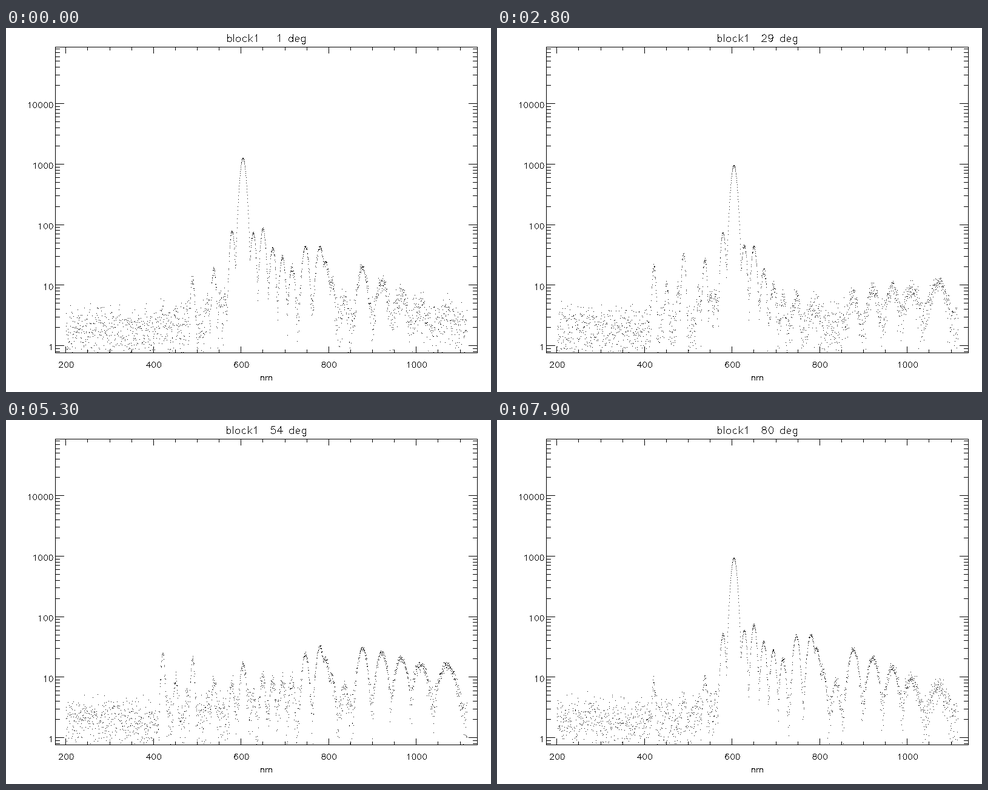
Recreate the animation shown at these times as a matplotlib script. Size 800 by 600 pixels, loop 8000 ms.

```python
import numpy as np
import matplotlib.pyplot as plt
from matplotlib.animation import FuncAnimation

W, H, DPI = 800, 600, 100
FRAMES, STEP = 80, 100
LEFT, RIGHT, TOP, BOTTOM = 80, 776, 31, 535
SAMPLES, NOISE = 2048, 1.5

# Peak height by pixel column: main line, side lobes, then a fading long-wave run
PEAKS = {258: 26, 279: 11, 307: 33, 342: 27, 372: 90, 390: 1340, 407: 74, 423: 86,
         439: 41, 455: 29, 471: 20, 493: 47, 517: 51, 526: 30, 536: 14, 727: 16}
PEAKS |= {587 + 32 * k: 34 * 0.78 ** k for k in range(4)}
PEAKS |= dict.fromkeys((298, 332, 352, 360, 558), 8)


def x_px(nm):
    return 97.8 + (nm - 200) * 0.7225


def y_px(value):
    return 523.7 - 99.75 * np.log10(value)


# Single-stroke lettering on a 21-unit cap height
def arc(cx, cy, rx, ry, start=0, end=360):
    t = np.radians(np.linspace(start, end, 17))
    return list(zip(cx + rx * np.cos(t), cy + ry * np.sin(t)))


HOOP = arc(9, 7, 6, 7)
SIX = [arc(10.5, 6.5, 6.5, 6.5), arc(11, 9, 7, 12, 50, 180) + [(4, 6.5)]]
STEM = [(4, 21), (4, 0)]
HUMP = [(4, 10)] + arc(10, 9, 5, 5, 140, 0) + [(15, 0)]

GLYPHS = {
    "0": (20, [arc(10, 10.5, 7, 10.5)]),
    "1": (20, [[(6, 17), (8, 18), (11, 21), (11, 0)]]),
    "2": (20, [arc(10, 15, 6, 6, 170, -35) + [(3, 0), (17, 0)]]),
    "3": (20, [[(5, 21), (16, 21), (10, 13)] + arc(10.5, 6.5, 6.5, 6.5, 90, -160)]),
    "4": (20, [[(13, 0), (13, 21), (3, 7), (18, 7)]]),
    "5": (20, [[(15, 21), (5, 21), (4, 12)] + arc(10, 7, 7, 7, 135, -155)]),
    "6": (20, SIX),
    "7": (20, [[(3, 21), (17, 21), (7, 0)]]),
    "8": (20, [arc(10, 16.5, 5.5, 4.5), arc(10, 6, 7, 6)]),
    "9": (20, [[(20 - x, 21 - y) for x, y in s] for s in SIX]),
    "b": (19, [STEM, arc(10, 7, 6, 7)]),
    "c": (18, [arc(9.5, 7, 6.5, 7, 50, 310)]),
    "d": (19, [[(15, 21), (15, 0)], HOOP]),
    "e": (18, [[(3, 8), (15, 8)] + arc(9, 7, 6, 7, 10, 315)]),
    "g": (19, [[(15, 14), (15, -2)] + arc(10, -2, 5, 5, 0, -140), HOOP]),
    "k": (17, [STEM, [(14, 14), (4, 4)], [(8, 8), (15, 0)]]),
    "l": (8, [STEM]),
    "m": (30, [[(4, 14), (4, 0)], HUMP, [(x + 11, y) for x, y in HUMP]]),
    "n": (19, [[(4, 14), (4, 0)], HUMP]),
    "o": (19, [arc(9.5, 7, 6.5, 7)]),
    " ": (16, []),
}


def lettering(text, x, baseline, scale=0.44, align=0.5):
    """Strokes for a text; align 0.5 centres it on x, 1 ends it there."""
    x -= align * scale * sum(GLYPHS[c][0] for c in text)
    strokes = []
    for c in text:
        width, lines = GLYPHS[c]
        for line in lines:
            p = np.array(line, float) * (scale, -scale) + (x, baseline)
            strokes.append(np.floor(p + 0.5))
        x += scale * width
    return strokes


def trace(strokes):
    """Single pixels along whole-pixel polylines, as x and y arrays."""
    runs = []
    for line in strokes:
        for a, b in zip(line[:-1], line[1:]):
            n = int(np.abs(b - a).max()) + 1
            runs.append(np.floor(np.linspace(a, b, n) + 0.5))
    return np.unique(np.concatenate(runs), axis=0).T + 0.5


def axis_lines():
    def seg(*ends):
        return np.floor(ends).reshape(2, 2)

    lines = [seg(LEFT, y, RIGHT, y) for y in (TOP, BOTTOM)]
    lines += [seg(x, TOP, x, BOTTOM) for x in (LEFT, RIGHT)]
    for nm in range(200, 1101, 50):
        x, size = x_px(nm), 5
        if nm % 200 == 0:
            size = 10
            lines += lettering(str(nm), x, 559)
        lines += [seg(x, BOTTOM, x, BOTTOM - size), seg(x, TOP, x, TOP + size)]
    for power in range(-1, 5):
        for digit in range(1, 10):
            y, size = y_px(digit * 10.0 ** power), 7
            if not TOP < y < BOTTOM:
                continue
            if digit == 1:
                size = 14
                lines += lettering(str(10 ** power), 77, y + 6.6, align=1)
            lines += [seg(LEFT, y, LEFT + size, y), seg(RIGHT, y, RIGHT - size, y)]
    return lines + lettering("nm", 428, 580)


px = np.linspace(98, 759.9, SAMPLES)
centre = np.array(list(PEAKS), float)[:, None]
height = np.array(list(PEAKS.values()), float)[:, None]

# Peaks widen to the red and, slightly, with height
width = (2.7 + 10 * ((centre - 258) / 469) ** 2.5) * (height / 30) ** 0.08
shape = np.exp(-0.5 * ((px - centre) / width) ** 2)

# The angle of greatest transmission drifts with wavelength
u = np.log((200 + (centre - 97.8) / 0.7225) / 671)
best = np.radians(-93 * u + 15 * u ** 2)
leak = np.maximum(np.minimum(3, 0.15 * height), 0.01 * height)


def spectrum(deg):
    swing = np.abs(np.cos(2 * (np.radians(deg) - best))) ** 1.4
    signal = (np.hypot(height * swing, leak) * shape).max(axis=0)
    noise = np.random.default_rng(deg).normal(0, NOISE, (2, SAMPLES))
    return np.hypot(signal + noise[0], noise[1])


fig = plt.figure(figsize=(W / DPI, H / DPI), dpi=DPI, facecolor="white")
ax = fig.add_axes([0, 0, 1, 1])
ax.set_xlim(0, W)
ax.set_ylim(H, 0)
ax.axis("off")

pixel = dict(color="black", antialiased=False)
ax.plot(*trace(axis_lines()), ",", **pixel)
title, = ax.plot([], [], ",", **pixel)
dots, = ax.plot([], [], ",", **pixel)


def update(frame):
    deg = frame + 1
    y = y_px(spectrum(deg))
    seen = y < BOTTOM
    dots.set_data(np.floor(px[seen]) + 0.5, np.floor(y[seen]) + 0.5)
    title.set_data(*trace(lettering(f"block1{deg:4d} deg", 428, 22, 0.55)))
    return dots, title


anim = FuncAnimation(fig, update, frames=FRAMES, interval=STEP,
                     init_func=lambda: update(0), repeat=True, repeat_delay=0)
plt.show()
```
